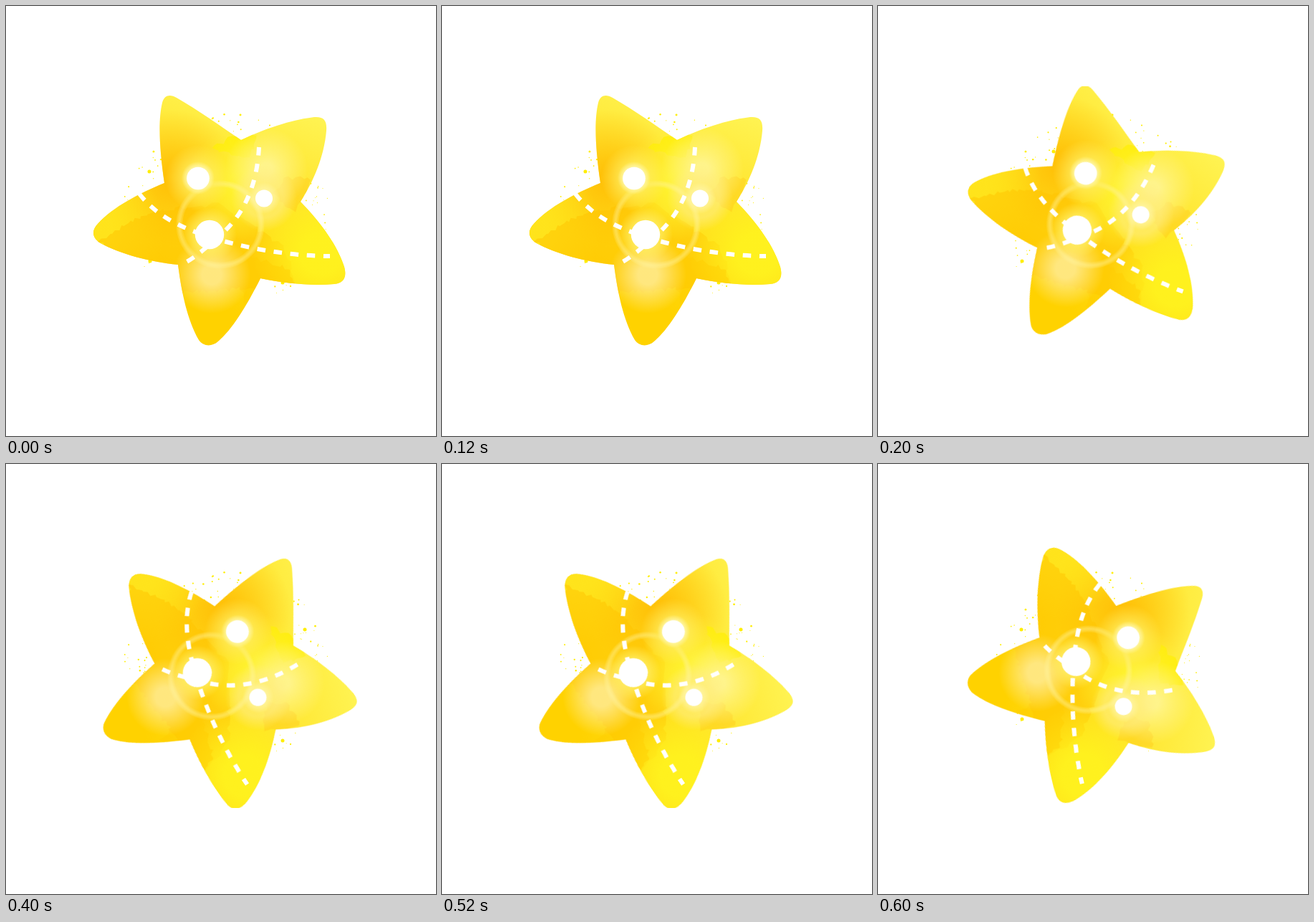
Animation, 600 px wide and 600 px high, one loop 0.8 s. Source, as an HTML page:

```html
<!DOCTYPE html>
<html lang="en">
<head>
<meta charset="utf-8">
<title>Twirling star</title>
<style>
  html, body { margin: 0; width: 100%; height: 100%; overflow: hidden; background: #fff; }
  svg { display: block; width: 600px; height: 600px; }
  #star { animation: twirl 800ms step-end infinite; }
  /* each pose turns the drawing about the middle of the star (310, 291.4) */
  @keyframes twirl {
    0%, 100% { transform: translate(310px, 291.4px) rotate(0deg) translate(-310px, -291.4px); }
    25%  { transform: translate(311.8px, 295.7px) rotate(20deg) translate(-310px, -291.4px); }
    50%  { transform: translate(304.4px, 297.2px) rotate(55.8deg) translate(-310px, -291.4px); }
    75%  { transform: translate(309px, 294.8px) rotate(77deg) translate(-310px, -291.4px); }
  }
  .dash { fill: none; stroke: #fff; stroke-width: 6; stroke-dasharray: 11.6; }
</style>
</head>
<body>
<svg viewBox="0 0 600 600">
  <defs id="defs">
    <linearGradient id="base" gradientUnits="userSpaceOnUse" x1="385" y1="130" x2="290" y2="420">
      <stop offset="0" stop-color="#fff454"/>
      <stop offset=".45" stop-color="#ffe32a"/>
      <stop offset="1" stop-color="#ffd200"/>
    </linearGradient>
    <clipPath id="frame"><rect x="122" y="112" width="368" height="368"/></clipPath>
    <clipPath id="shape">
      <path d="M221 247C214 200 212 160 218 135C221 124 229 123 238 128C268 145 300 168 328 187
        C370 167 405 158 430 155C444 154 448 160 447 174C444 210 429 245 411 273
        C440 303 463 335 472 364C476 379 471 387 458 388C425 391 390 387 355 380
        C335 420 315 452 296 468C287 476 275 475 269 466C253 438 245 400 240 361
        C200 357 160 346 132 331C120 324 119 313 128 304C150 280 185 262 221 247Z"/>
    </clipPath>
  </defs>
  <g clip-path="url(#frame)">
    <g id="specks" fill="#ffee00"></g>
    <g id="star">
      <g clip-path="url(#shape)">
        <rect x="100" y="100" width="400" height="400" fill="url(#base)"/>
        <g id="paint"></g>
      </g>
      <path class="dash" d="M186 262C205 287 235 307 284 322C335 339 400 349 452 349"/>
      <path class="dash" d="M353 197C351 240 338 285 300 319C285 332 268 348 252 357"/>
      <g fill="#fff">
        <circle cx="268" cy="240.5" r="15.8"/>
        <circle cx="360" cy="268.5" r="12"/>
        <circle cx="284" cy="319" r="20.2"/>
      </g>
    </g>
  </g>
</svg>
<script>
  const byId = id => document.getElementById(id);

  function add(parent, tag, attrs) {
    const el = document.createElementNS('http://www.w3.org/2000/svg', tag);
    for (const key in attrs) el.setAttribute(key, attrs[key]);
    return parent.appendChild(el);
  }

  let seed = 11;
  const rand = () => (seed = seed * 16807 % 2147483647) / 2147483647;
  const between = (a, b) => a + (b - a) * rand();

  let glows = 0;
  // soft round spot; hold is the share of the radius at full strength
  function glow(cx, cy, r, color, alpha = 1, hold = 0) {
    const id = 'glow' + glows++;
    const grad = add(byId('defs'), 'radialGradient', { id });
    const stop = (offset, opacity) =>
      add(grad, 'stop', { offset, 'stop-color': color, 'stop-opacity': opacity });
    stop(hold, alpha);
    stop((1 + hold) / 2, alpha / 2);
    stop(1, 0);
    add(byId('paint'), 'circle', { cx, cy, r, fill: `url(#${id})` });
  }

  // watercolour patch with a ragged rim through a few corners
  function patch(corners, color, opacity, rough = 6) {
    const pts = corners.flatMap(([x, y], i) => {
      const [nx, ny] = corners[(i + 1) % corners.length];
      const n = Math.ceil(Math.hypot(nx - x, ny - y) / 5);
      return Array.from({ length: n }, (_, k) => [
        x + (nx - x) * k / n + between(-rough, rough) / 2,
        y + (ny - y) * k / n + between(-rough, rough) / 2
      ]);
    });
    add(byId('paint'), 'polygon', { points: pts.join(' '), fill: color, opacity });
  }

  // orange shade, yellow tips
  glow(232, 240, 95, '#ffb900', .8, .1);
  glow(122, 312, 100, '#ffe41c', .95, .25);
  patch([[130, 330], [170, 303], [212, 285], [300, 276], [390, 338], [404, 390], [240, 400]], '#ffc400', .5);
  glow(440, 345, 95, '#fff21e', .95, .3);
  patch([[318, 366], [340, 350], [394, 366], [402, 388], [334, 414]], '#ffcc00', .45);
  patch([[290, 200], [316, 180], [350, 178], [340, 215]], '#ffee00', .8);

  // light in the middle
  glow(328, 248, 78, '#fff22e', .95, .2);
  patch([[372, 262], [390, 240], [424, 240], [405, 290]], '#ffc61a', .4);
  glow(363, 228, 58, '#fff59a', .85, .15);
  glow(360, 268, 46, '#ffec80', .6, .6);
  glow(287, 375, 54, '#ffea8c', .9, .25);
  for (const width of [3, 6, 9]) {
    add(byId('paint'), 'circle', {
      cx: 299, cy: 305, r: 57, fill: 'none', stroke: '#fff0a0', 'stroke-width': width, opacity: .17
    });
  }

  // halos of the three dots
  glow(268, 240, 46, '#ffee60', .9, .3);
  glow(268, 240, 23, '#fffac0', .8, .6);
  glow(360, 268, 22, '#fff6b0', .8, .4);
  glow(284, 319, 38, '#fff06a', .85, .45);

  // resting sparks on a belt, open at the bottom
  const spark = (cx, cy, r) => add(byId('specks'), 'circle', { cx, cy, r });
  for (let i = 0; i < 130; i++) {
    const a = between(133, 426) * Math.PI / 180;
    const r = between(106, 146);
    spark(308 + r * Math.cos(a), 285 + r * .92 * Math.sin(a), .5 + rand() ** 2);
  }
  for (const [x, y] of [[200, 231], [245, 203], [201, 356], [386, 386], [417, 231]]) spark(x, y, 2.5);
</script>
</body>
</html>
```
